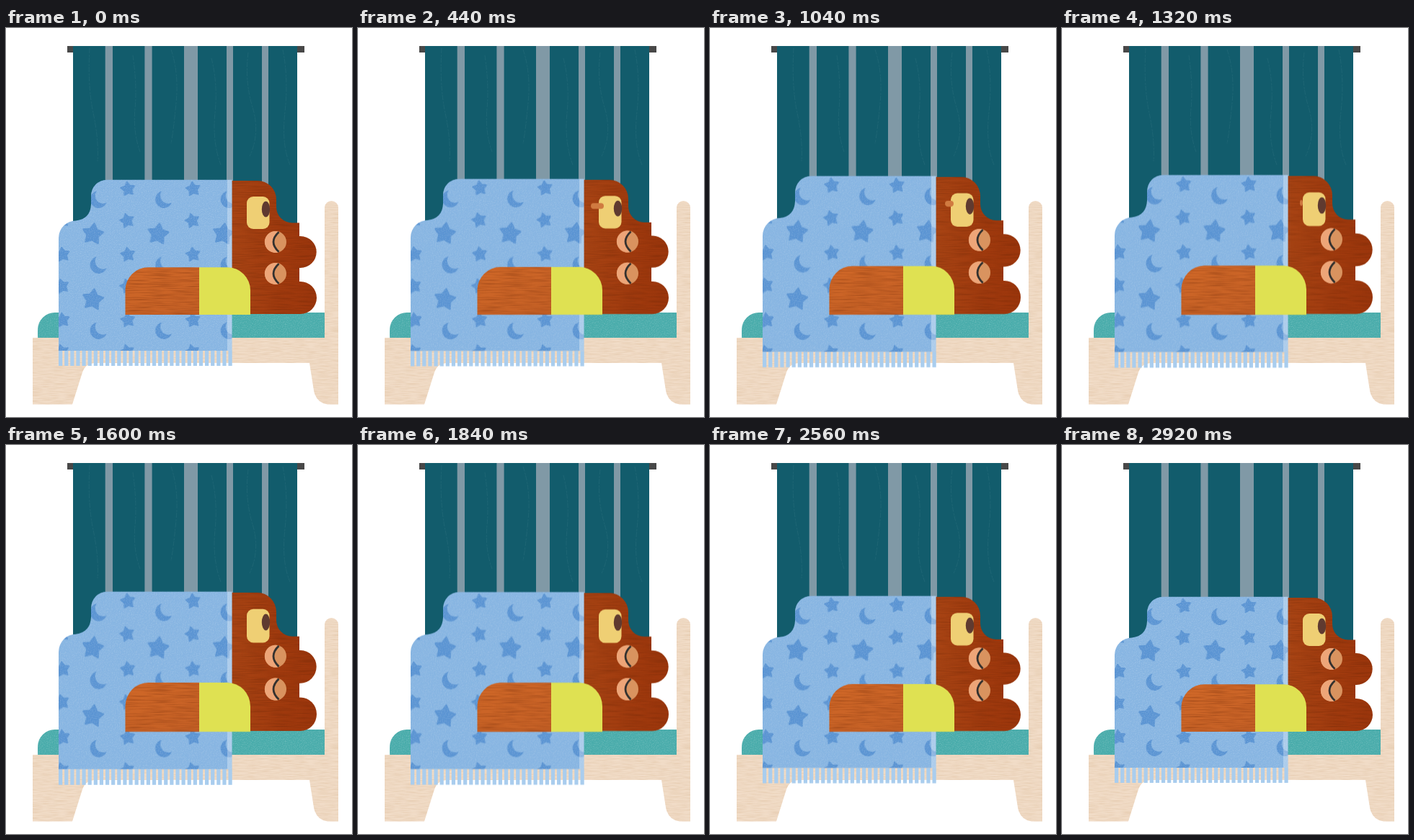
Recreate the animation shown at these times as an HTML page without scripts. Size 480 by 540 pixels, loop 2960 ms.

```html
<!DOCTYPE html>
<html lang="en">
<head>
<meta charset="utf-8">
<title>Sleeping bear</title>
<style>
  html, body { margin: 0; width: 100%; height: 100%; overflow: hidden; background: #fff; }
  svg { display: block; width: 100vw; height: 100vh; }

  .breath { transform-origin: 0 397px; animation: breathe 2960ms infinite; }
  .mouth { animation: puff 2960ms linear infinite; }
  .threads { animation: threads 2960ms step-end infinite; }

  @keyframes breathe {
    0% { transform: scaleY(1); animation-timing-function: cubic-bezier(.37, 0, .63, 1); }
    54% { transform: scaleY(1.0385); animation-timing-function: cubic-bezier(.37, 0, .63, 1); }
    98.6%, 100% { transform: scaleY(1); }
  }
  @keyframes puff {
    0%, 2.7% { x: 332px; width: 0; }
    14.9% { x: 323px; width: 18px; }
    22% { x: 323px; width: 18px; }
    35.1% { x: 326px; width: 12px; }
    44.6% { x: 330px; width: 4px; }
    47.3%, 100% { x: 332px; width: 0; }
  }
  @keyframes threads {
    0% { opacity: .14; }
    97.3%, 100% { opacity: 0; }
  }
</style>
</head>
<body>
<svg viewBox="0 0 480 540" xmlns="http://www.w3.org/2000/svg">
  <defs>
    <filter id="wood" x="0" y="0" width="100%" height="100%" color-interpolation-filters="sRGB">
      <feTurbulence type="fractalNoise" baseFrequency=".03 .7" numOctaves="2" seed="4"/>
      <feColorMatrix values="0 0 0 0 .4  0 0 0 0 .14  0 0 0 0 .02  .8 0 0 0 -.34"/>
      <feComposite in2="SourceAlpha" operator="in"/>
      <feMerge><feMergeNode in="SourceGraphic"/><feMergeNode/></feMerge>
    </filter>
    <filter id="pine" x="0" y="0" width="100%" height="100%" color-interpolation-filters="sRGB">
      <feTurbulence type="fractalNoise" baseFrequency=".06 .7" numOctaves="2" seed="9"/>
      <feColorMatrix values="0 0 0 0 .85  0 0 0 0 .72  0 0 0 0 .58  .8 0 0 0 -.3"/>
      <feComposite in2="SourceAlpha" operator="in"/>
      <feMerge><feMergeNode in="SourceGraphic"/><feMergeNode/></feMerge>
    </filter>
    <filter id="felt" x="0" y="0" width="100%" height="100%" color-interpolation-filters="sRGB">
      <feTurbulence type="fractalNoise" baseFrequency=".7" numOctaves="2" seed="2"/>
      <feColorMatrix values="0 0 0 0 1  0 0 0 0 1  0 0 0 0 1  .4 0 0 0 -.17"/>
      <feComposite in2="SourceAlpha" operator="in"/>
      <feMerge><feMergeNode in="SourceGraphic"/><feMergeNode/></feMerge>
    </filter>

    <linearGradient id="fur">
      <stop offset="0" stop-color="#a84414"/>
      <stop offset=".6" stop-color="#a03a0e"/>
      <stop offset="1" stop-color="#9c360c"/>
    </linearGradient>
    <linearGradient id="sleeve" x2=".6" y2="1">
      <stop offset="0" stop-color="#d06828"/>
      <stop offset="1" stop-color="#c66126"/>
    </linearGradient>

    <path id="star" d="M0-10 3.3-4.5 9.5-3.1 5.3 1.7 5.9 8.1 0 5.600-5.9 8.1-5.3 1.7-9.5-3.1-3.3-4.5z"
          stroke="#5a94d3" stroke-width="1.8" stroke-linejoin="round"/>
    <pattern id="night" x="98" y="211" width="90.5" height="91" patternUnits="userSpaceOnUse">
      <rect width="91" height="91" fill="#87b5e2"/>
      <g fill="#5a94d3">
        <use href="#star" transform="translate(22.5 75) rotate(8) scale(1.45)"/>
        <use href="#star" transform="translate(71 12.5) rotate(-8)"/>
        <use href="#star" transform="translate(70 56.5) rotate(-14)"/>
        <path d="M27.5 15.5A11.9 11.9 0 1 0 41.5 31.5A11 11 0 0 1 27.5 15.5z"/>
      </g>
    </pattern>

    <g id="eye">
      <circle r="15" fill="#d9935f"/>
      <path d="M4-14.4A15 15 0 1 0 4 14.4Q-11 0 4-14.4z" fill="#eda578"/>
      <path d="M4.500-13.8Q-10.500 0 4.500 13.8" fill="none" stroke="#33312f" stroke-width="2.8"/>
    </g>
  </defs>

  <!-- window -->
  <rect x="85" y="25" width="329" height="9" fill="#484848"/>
  <rect x="93" y="25" width="311" height="258" fill="#125c6c"/>
  <path d="M137.700 25h10.300v258h-10.300zM192.400 25h10.200v258h-10.200zM247 25h19v258h-19zM306 25h9v258h-9zM355 25h9v258h-9z"
        fill="#8099a6"/>
  <g class="threads" fill="none" stroke="#7fb0b6" stroke-width=".8" stroke-dasharray="7 2 3 1">
    <path d="M116 28Q113 80 121 118T127 185M176 38Q182 80 179 112T186 172M229 30Q240 62 236 104T229 160"/>
    <path d="M285 42Q294 78 290 118T298 190M336 34Q331 74 342 110T338 178M384 30Q392 70 387 116T394 190"/>
  </g>

  <!-- bed -->
  <path d="M44 432V419A24 24 0 0 1 68 395H444V432z" fill="#49acab" filter="url(#felt)"/>
  <path d="M37 430H442V249.500a9.500 9.500 0 0 1 19 0V522.500H446Q430 520 427 503L421 465H122Q110 466 106 478L92 522.500H37z"
        fill="#f1dcc7" filter="url(#pine)"/>

  <g class="breath">
    <!-- head -->
    <path d="M313 212H349A26 26 0 0 1 375 238V248.500A22 22 0 0 0 397 270.500H407V289H408.500A22.200 22 0 0 1 408.500 333H407V352H408.500A22.500 22.500 0 0 1 408.500 397H313z"
          fill="url(#fur)" filter="url(#wood)"/>
    <rect x="334" y="234" width="31.500" height="45" rx="9" fill="#efcf74"/>
    <ellipse cx="360.500" cy="251.500" rx="5.700" ry="11" fill="#5f3a30"/>
    <rect class="mouth" x="332" y="244" width="0" height="8" ry="4" fill="#d07a40"/>
    <use href="#eye" x="374" y="297"/>
    <use href="#eye" x="374" y="341"/>

    <!-- blanket -->
    <path d="M73 458.500H314" stroke="#a9cdee" stroke-width="21" stroke-dasharray="5.200 2.920"/>
    <path d="M73 448V291A24 24 0 0 1 97 267.500Q117 265 118 245V233A22 22 0 0 1 140 210.800H313.500V448z"
          fill="url(#night)" filter="url(#felt)"/>
    <rect x="307" y="210.800" width="6.500" height="237.200" fill="#fff" opacity=".3"/>

    <!-- arm -->
    <path d="M165.500 398V364A32 32 0 0 1 197.500 332.200H268V398z" fill="url(#sleeve)" filter="url(#wood)"/>
    <path d="M268 398V332.200H307A32 32 0 0 1 339 364V398z" fill="#dfe152"/>
  </g>
</svg>
</body>
</html>
```
